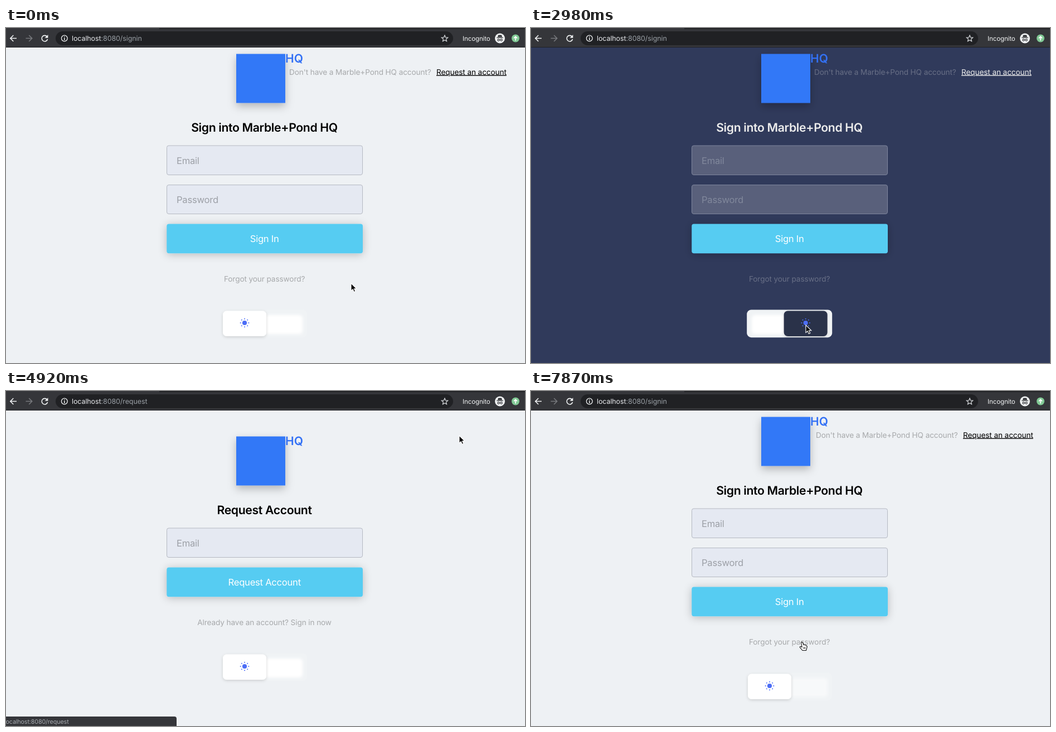
An HTML page for the animation above (8 s loop, 931 by 601 pixels).

```html
<!DOCTYPE html>
<html lang="en">
<head>
<meta charset="utf-8">
<title>Sign in, light and dark</title>
<style>
  html, body { margin: 0; width: 100%; height: 100%; overflow: hidden; }
  svg { display: block; width: 931px; height: 601px; font-family: Inter, Roboto, sans-serif; text-rendering: geometricPrecision; }
  .mid { text-anchor: middle; }
  .title { font-size: 21.2px; font-weight: 600; letter-spacing: -.35px; }
  .field { font-size: 16.6px; letter-spacing: -.25px; }
  .small { font-size: 13.6px; letter-spacing: -.1px; }
  .url { font-size: 12.5px; letter-spacing: -.1px; }
  .line { fill: none; stroke: #f1f3f4; stroke-width: 1.6; }
</style>
</head>
<body>
<svg viewBox="0 0 931 601" xmlns="http://www.w3.org/2000/svg">
  <defs>
    <filter id="lift" x="-40%" y="-40%" width="180%" height="190%">
      <feDropShadow dx="0" dy="6" stdDeviation="7.5" flood-opacity=".25"/>
    </filter>
    <filter id="glow" x="-15%" y="-80%" width="130%" height="260%">
      <feDropShadow dx="0" dy="2" stdDeviation="7.5" flood-opacity=".24"/>
    </filter>
    <filter id="press" x="-30%" y="-30%" width="160%" height="170%">
      <feDropShadow dx="0" dy="1.5" stdDeviation="2.5" flood-opacity=".17"/>
    </filter>
    <filter id="soft" x="-10%" y="-30%" width="120%" height="160%">
      <feGaussianBlur stdDeviation="2.5"/>
    </filter>
  </defs>

  <rect id="page" width="931" height="601"/>

  <g id="header" class="small">
    <text class="muted" x="508" y="83.5">Don't have a Marble+Pond HQ account?</text>
    <text class="ink" x="772" y="83.5" text-decoration="underline">Request an account</text>
  </g>

  <g id="upper">
    <rect x="413" y="46.5" width="88" height="88" fill="#3378f7" filter="url(#lift)"/>
    <text x="501" y="62" font-size="21" font-weight="600" fill="#3371f5">HQ</text>
    <text id="title" class="title mid ink" x="463.5" y="186"></text>
    <rect class="box" x="288.5" y="211" width="351" height="52.5" rx="3.5"/>
    <text class="field hint" x="306" y="244">Email</text>
  </g>

  <g id="secret">
    <rect class="box" x="288.5" y="281.5" width="351" height="52" rx="3.5"/>
    <text class="field hint" x="306" y="314.3">Password</text>
  </g>

  <g id="lower">
    <rect x="288.3" y="351.5" width="351.7" height="52.7" rx="4" fill="#56ccf2" filter="url(#glow)"/>
    <text id="action" class="field mid" x="463.7" y="384" fill="#fff"></text>
    <text id="foot" class="small mid muted" x="463.6" y="455"></text>
    <rect id="track" x="387.2" y="505.5" width="153" height="49.7" rx="8"/>
    <rect id="well" x="396" y="515" width="136" height="34" rx="6" filter="url(#soft)"/>
    <g id="knob">
      <rect id="cap" x="389" y="507.5" width="78" height="45.5" rx="7" filter="url(#press)"/>
      <g id="sun" transform="translate(428 529)" fill="#4c6df6"><circle r="4.1"/></g>
      <path id="moon" transform="translate(428 529)" fill="#4c6df6" d="M-4.5 -8A8.6 8.6 0 1 0 7.8 4A9.6 9.6 0 0 1 -4.5 -8Z"/>
    </g>
  </g>

  <g id="status">
    <rect x="-8" y="584" width="314" height="25" rx="4" fill="#35363a"/>
    <text id="hover" x="-3" y="597" font-size="10.8" letter-spacing="-.15" fill="#a9adb2"></text>
  </g>

  <g id="browser">
    <rect width="931" height="35" fill="#35363a"/>
    <rect y="34" width="931" height="1" fill="#202124"/>
    <rect x="275" width="656" height="2" fill="#202124"/>
    <rect x="89" y="6" width="713" height="25" rx="12.5" fill="#202124"/>
    <path class="line" d="M19 18.5H8M13.3 13L7.8 18.5L13.3 24"/>
    <path class="line" style="stroke:#77797d" d="M35.5 18.5H46.5M41.2 13L46.7 18.5L41.2 24"/>
    <path class="line" d="M73.6 15.3A5.3 5.3 0 1 0 74.6 20"/>
    <path d="M75.4 12V17.7H69.7Z" fill="#f1f3f4"/>
    <circle class="line" cx="104.8" cy="18.5" r="5.4" style="stroke-width:1.3"/>
    <path class="line" d="M104.8 17.7V21.7M104.8 15.2V16.6"/>
    <text class="url" x="118" y="23" fill="#e8eaed">localhost<tspan id="path" fill="#9aa0a6"></tspan></text>
    <path id="star" class="line" style="stroke:#d3d6d9;stroke-width:1.2"/>
    <text x="819" y="22.8" font-size="11.5" letter-spacing="-.1" fill="#f1f3f4">Incognito</text>
    <circle cx="886" cy="18.5" r="9" fill="#f1f3f4"/>
    <path d="M880 17.5H892M882.5 16L883.5 13H888.5L889.5 16Z" fill="#35363a" stroke="#35363a" stroke-width="1.1"/>
    <g fill="none" stroke="#35363a" stroke-width="1.1">
      <circle cx="883.4" cy="21.6" r="1.7"/><circle cx="888.6" cy="21.6" r="1.7"/><path d="M885 21.3H887"/>
    </g>
    <circle cx="914" cy="18.5" r="7" fill="#81c995"/>
    <path d="M914 22.5V15.5M911 18.3L914 15.3L917 18.3" fill="none" stroke="#fff" stroke-width="1.7"/>
  </g>

  <g id="cursor">
    <path id="arrow" d="M0 0V13.5L3.2 10.7L5.3 15.5L7.7 14.5L5.6 9.8H9.8Z" fill="#000" stroke="#fff" stroke-width="1.1"/>
    <path id="hand" d="M-2.5 1.5Q-1.5 -.5 .3 1L2 5.5Q3.5 4.5 4.3 5.8Q6 5.2 6.5 6.8Q8.3 6.8 8.2 9L7.3 12.5L6.5 15.5H0L-4.5 10.2Q-5.3 8.3 -3.2 8.3L-.8 9.5ZM2.3 9.5V12.5M4.5 9.5V12.5" fill="#fff" stroke="#111" stroke-width="1.1" stroke-linejoin="round"/>
  </g>
</svg>

<script>
const LOOP = 8000, STEP = 148.7;
const get = id => document.getElementById(id);
const all = name => [...document.querySelectorAll('.' + name)];
const set = (id, name, value) => get(id).setAttribute(name, value);
const show = (id, on) => set(id, 'visibility', on ? 'visible' : 'hidden');
const move = (id, x, y) => set(id, 'transform', `translate(${x} ${y})`);
const label = (id, text) => { if (get(id).textContent !== text) get(id).textContent = text; };

// Pairs of light and dark colours
const THEME = {
  page: [[238, 241, 244], [32, 43, 78]],
  ink: [[0, 0, 0], [255, 255, 255]],
  box: [[229, 233, 242], [77, 85, 113]],
  edge: [[181, 185, 194], [122, 129, 154]],
  hint: [[157, 160, 167], [127, 134, 155]],
  cap: [[255, 255, 255], [27, 33, 59]]
};

// Pointer stops: step, x, y
const STOPS = [
  [0, 619, 458], [1, 585, 472], [3, 465, 521], [4, 442, 530], [7, 442, 530],
  [12, 492, 533], [14, 493, 533], [22, 493, 533], [23, 530, 480], [26, 760, 150],
  [27, 794, 98], [29, 813, 82], [33, 813, 80], [38, 813, 80], [39, 740, 150],
  [41, 507, 369], [42, 507, 369], [44, 481, 412], [48, 481, 412], [51, 487, 450]
];

const clamp = v => Math.max(0, Math.min(1, v));
const lerp = (a, b, p) => a + (b - a) * p;
const ease = v => { const p = clamp(v); return p * p * (3 - 2 * p); };

function pointer(k) {
  const i = STOPS.findIndex(s => s[0] > k);
  if (i < 0) return STOPS[STOPS.length - 1].slice(1);
  const [a, b] = [STOPS[i - 1], STOPS[i]], p = (k - a[0]) / (b[0] - a[0]);
  return [lerp(a[1], b[1], p), lerp(a[2], b[2], p)];
}

function statusOpacity(k) {
  const fade = end => clamp((end - k) / 3);
  if (k >= 31 && k < 37) return fade(37);
  return k >= 46 ? fade(51) : 0;
}

function draw(time) {
  const k = Math.floor((time % LOOP + 12) / STEP), now = k * STEP;
  const dark = k >= 7 && k < 20, request = k >= 33 && k < 48;
  const night = ease((now - 893) / 260) - ease((now - 2930) / 260);
  const tint = name => {
    const [a, b] = THEME[name];
    return `rgb(${a.map((v, i) => Math.round(lerp(v, b[i], night)))})`;
  };
  const paint = (name, fill) => all(name).forEach(el => el.setAttribute('fill', fill));

  set('page', 'fill', tint('page'));
  paint('ink', tint('ink'));
  paint('hint', tint('hint'));
  paint('box', tint('box'));
  all('box').forEach(el => el.setAttribute('stroke', tint('edge')));
  paint('muted', tint('ink').replace('rgb', 'rgba').replace(')', ',.3)'));

  set('track', 'fill', dark ? 'rgba(255,255,255,.12)' : '#f0f3f5');
  set('track', 'stroke', dark ? 'rgba(255,255,255,.1)' : 'none');
  set('well', 'fill', dark ? 'rgba(32,43,78,.25)' : '#fff');
  set('well', 'opacity', k >= 48 ? .5 : 1);
  set('cap', 'fill', tint('cap'));
  move('knob', 70 * night, 0);
  show('sun', !dark);
  show('moon', dark);

  show('header', !request);
  show('secret', !request);
  move('header', k >= 48 ? 3 : 0, 0);
  move('upper', 0, request ? 35 : 0);
  move('lower', 0, request ? -35 : 0);
  label('title', request ? 'Request Account' : 'Sign into Marble+Pond HQ');
  label('action', request ? 'Request Account' : 'Sign In');
  label('foot', request ? 'Already have an account? Sign in now' : 'Forgot your password?');
  label('path', request ? ':8080/request' : ':8080/signin');
  label('hover', 'localhost:8080/' + (k < 46 ? 'request' : 'signin'));
  set('status', 'opacity', statusOpacity(k));

  const hand = k === 31 || k === 32 || (k >= 44 && k < 47) || k >= 51;
  show('hand', hand);
  show('arrow', !hand);
  move('cursor', ...pointer(k));
}

const polar = (r, angle) => [r * Math.cos(angle), r * Math.sin(angle)];
for (let i = 0; i < 8; i++) {
  const dot = document.createElementNS('http://www.w3.org/2000/svg', 'circle');
  const [x, y] = polar(7.3, i * Math.PI / 4);
  dot.setAttribute('cx', x);
  dot.setAttribute('cy', y);
  dot.setAttribute('r', 1);
  get('sun').append(dot);
}
const tips = Array.from({ length: 10 }, (_, i) => {
  const [x, y] = polar(i % 2 ? 2.7 : 6, (i * 36 - 90) * Math.PI / 180);
  return [787 + x, 19 + y];
});
set('star', 'd', 'M' + tips.join('L') + 'Z');

const start = performance.now();
function frame() {
  draw(performance.now() - start);
  requestAnimationFrame(frame);
}
frame();
</script>
</body>
</html>
```
